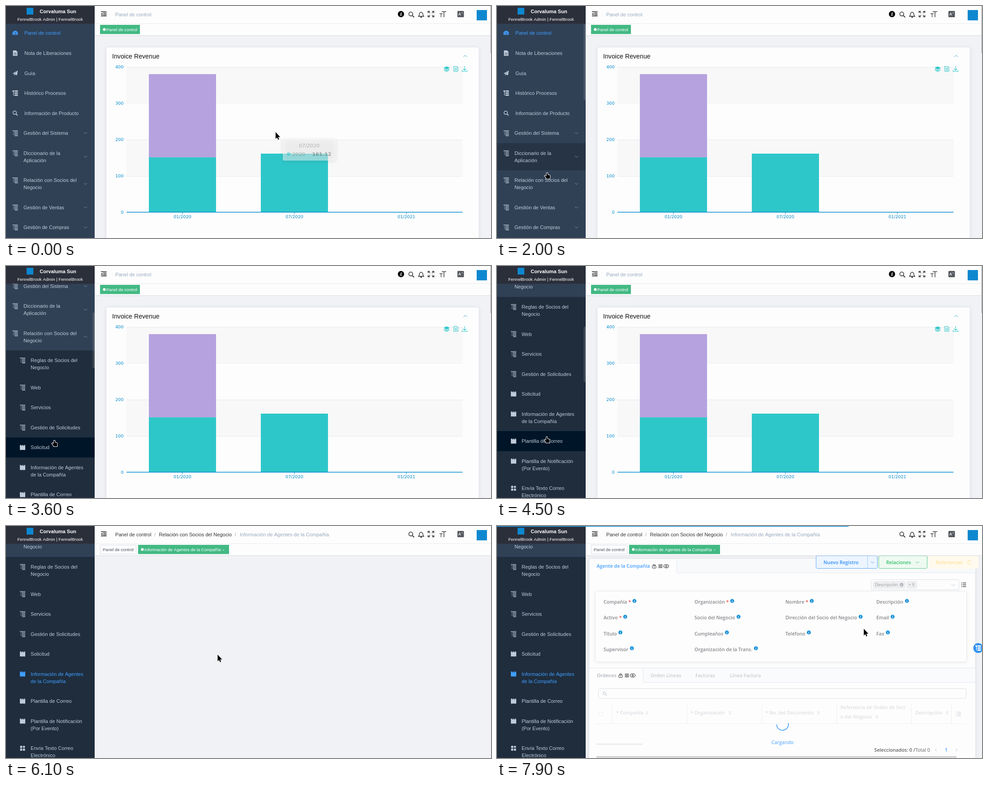
These frames come from a looping animation (1083x517 px, 8 s). An HTML page with a canvas:

```html
<!DOCTYPE html>
<html lang="es">
<head>
<meta charset="utf-8">
<title>Panel de control</title>
<style>
html, body { margin: 0; width: 100%; height: 100%; overflow: hidden; background: #f1f2f5; }
canvas { display: block; }
</style>
</head>
<body>
<canvas id="stage" width="1083" height="517"></canvas>
<script>
const W = 1083, H = 517, LOOP = 8000, STEP = 100;
const SANS = '"Liberation Sans", Arial, sans-serif';
const CHART = '"DejaVu Sans", sans-serif';
const FORM = '"Open Sans", "Noto Sans", sans-serif';
const TEAL = '#2ec7c9', PURPLE = '#b6a2de', AXIS = '#008acd', BLUE = '#409eff', PAPER = '#fdfdfd';
const screen = document.getElementById('stage').getContext('2d');
const layer = new OffscreenCanvas(W, H).getContext('2d');
let g = screen;

// Timing
const clamp = v => Math.max(0, Math.min(1, v));
const span = (t, start, length) => clamp((t - start) / length);
const smooth = p => p * p * (3 - 2 * p);

function bezier(x1, y1, x2, y2) {
  const at = (a, b, s) => 3 * a * s * (1 - s) ** 2 + 3 * b * s * s * (1 - s) + s ** 3;
  return p => {
    if (p <= 0 || p >= 1) return clamp(p);
    let lo = 0, hi = 1;
    for (let i = 0; i < 20; i++) {
      const mid = (lo + hi) / 2;
      if (at(x1, x2, mid) < p) lo = mid; else hi = mid;
    }
    return at(y1, y2, lo);
  };
}
const ease = bezier(.25, .1, .25, 1), easeInOut = bezier(.42, 0, .58, 1);

function track(keys, t) {
  const i = keys.findIndex(k => k[0] > t);
  if (i < 0) return keys[keys.length - 1].slice(1);
  if (i === 0) return keys[0].slice(1);
  const a = keys[i - 1], b = keys[i], p = smooth((t - a[0]) / (b[0] - a[0]));
  return [a[1] + (b[1] - a[1]) * p, a[2] + (b[2] - a[2]) * p];
}

// Drawing helpers
function text(str, x, y, size, color, { font = SANS, weight = 400, align = 'left' } = {}) {
  g.font = `${weight} ${size}px ${font}`;
  g.textAlign = align;
  g.fillStyle = color;
  g.fillText(str, x, y + size * .36);
  return g.measureText(str).width;
}
const label = (str, x, y, color, more) => text(str, x, y, 10.7, color, { font: FORM, weight: 600, ...more });

function rect(x, y, w, h, fill) { g.fillStyle = fill; g.fillRect(x, y, w, h); }

function box(x, y, w, h, r, fill, stroke, shadow) {
  g.beginPath();
  g.roundRect(x, y, w, h, r);
  if (shadow) { g.shadowColor = shadow; g.shadowBlur = 9; g.shadowOffsetY = 1.5; }
  g.fillStyle = fill;
  g.fill();
  g.shadowColor = 'transparent';
  if (stroke) { g.strokeStyle = stroke; g.lineWidth = 1; g.stroke(); }
}

function line(color, width, ...pts) {
  g.beginPath();
  for (let i = 0; i < pts.length; i += 2) g.lineTo(pts[i], pts[i + 1]);
  g.strokeStyle = color;
  g.lineWidth = width;
  g.stroke();
}

function disc(x, y, r, fill) {
  g.beginPath();
  g.arc(x, y, r, 0, 7);
  g.fillStyle = fill;
  g.fill();
}

function ring(x, y, r, color, width, from = 0, to = 2 * Math.PI) {
  g.beginPath();
  g.arc(x, y, r, from, to);
  g.strokeStyle = color;
  g.lineWidth = width;
  g.stroke();
}

function shape(x, y, pts, fill, stroke, width = 1) {
  g.beginPath();
  for (let i = 0; i < pts.length; i += 2) g.lineTo(x + pts[i], y + pts[i + 1]);
  g.closePath();
  if (stroke) { g.strokeStyle = stroke; g.lineWidth = width; g.stroke(); }
  if (fill) { g.fillStyle = fill; g.fill(); }
}

const chevron = (x, y, color, dir = 1, s = 3.5) =>
  line(color, 1, x - s, y - dir * s / 2, x, y + dir * s / 2, x + s, y - dir * s / 2);

// Icons, centred on x, y
const icons = {
  gauge(x, y, c) {
    g.beginPath();
    g.arc(x, y + 1, 6.3, 2.7, .44);
    g.closePath();
    g.fillStyle = c;
    g.fill();
    line('#304156', 1.2, x, y + 3, x + 1.5, y - 2);
    [[-4, 1], [-2.5, -2], [4, 1]].forEach(([a, b]) => disc(x + a, y + b, .8, '#304156'));
  },
  page(x, y, c) {
    shape(x, y, [-5, -6, 2, -6, 5, -3, 5, 6, -5, 6], c);
    line('#304156', 1, x - 3, y, x + 3, y);
    line('#304156', 1, x - 3, y + 3, x + 3, y + 3);
  },
  plane(x, y, c) {
    shape(x, y, [-6, 1, 6, -6, 4, 5, 0, 3, -2, 6, -2, 2], c);
    line('#304156', .8, x - 2, y + 2, x + 4, y - 4);
  },
  tree(x, y, c) {
    rect(x - 6, y - 6, 4, 3, c);
    line(c, 1, x - 4, y - 4, x - 4, y + 4.5, x, y + 4.5);
    line(c, 1, x - 4, y, x, y);
    [-6, -1.5, 3].forEach(d => rect(x - 1, y + d, 7, 3, c));
  },
  search(x, y, c, s = 1) {
    ring(x - s, y - s, 3.8 * s, c, 1.5 * s);
    line(c, 1.9 * s, x + 2 * s, y + 2 * s, x + 5.5 * s, y + 5.5 * s);
  },
  list(x, y, c) {
    rect(x - 6, y - 6, 12, 1.3, c);
    [-3, 0, 3, 5.6].forEach((d, i) => {
      rect(x - (i === 3 ? 1 : 2), y + d - .3, i === 3 ? 7 : 8, 1.3, c);
      if (i < 3) rect(x - 4.5, y + d - .3, 1.2, 1.3, c);
    });
  },
  tab(x, y, c) {
    rect(x - 6, y - 4, 12, 9.5, c);
    rect(x - 6, y - 5.5, 3, 2, c);
    rect(x - 1.5, y - 5.5, 3, 1.2, c);
    rect(x + 3, y - 5.5, 3, 1.2, c);
  },
  grid(x, y, c) {
    box(x - 5.5, y - 5.5, 4.8, 4.8, 1, c);
    box(x + .7, y - 5.5, 4.8, 4.8, 2.4, c);
    box(x - 5.5, y + .7, 4.8, 4.8, 1, c);
    box(x + .7, y + .7, 4.8, 4.8, 1, c);
  },
  lock(x, y) {
    ring(x, y - 1.5, 2.3, '#303133', 1.1, Math.PI, 0);
    box(x - 4, y - 1, 8, 5.5, 1, PAPER, '#303133');
    rect(x - .5, y + .5, 1, 2.2, '#303133');
  },
  bars(x, y, c = '#303133') { [-3.6, -.6, 2.4].forEach(d => rect(x - 4.5, y + d, 9, 1.4, c)); },
  eye(x, y) {
    g.beginPath();
    g.ellipse(x, y, 5.6, 3.8, 0, 0, 7);
    g.strokeStyle = '#303133';
    g.lineWidth = 1.1;
    g.stroke();
    ring(x, y, 1.7, '#303133', 1.1);
  },
  rows(x, y, c) {
    [-4, 0, 4].forEach(d => { rect(x - 5.5, y + d - .7, 2, 1.5, c); rect(x - 2, y + d - .7, 7.5, 1.5, c); });
  },
  info(x, y, r, c) {
    disc(x, y, r, c);
    text('i', x, y, r * 1.6, '#fff', { font: '"Noto Serif", serif', weight: 'italic 700', align: 'center' });
  },
  sort(x, y, c) {
    shape(x, y, [-3.5, -1, 0, -4, 3.5, -1], c);
    shape(x, y, [-3.5, 1, 0, 4, 3.5, 1], c);
  }
};

// Sidebar
const ROW = 44.55, ROW2 = 60.5, EXPAND = 2400, CLICK = 5520;
const OPEN_GROUP = 7, OPEN_PAGE = 5;
const menu = [
  ['gauge', 'Panel de control'], ['page', 'Nota de Liberaciones'], ['plane', 'Guía'],
  ['tree', 'Histórico Procesos'], ['search', 'Información de Producto'],
  ['list', 'Gestión del Sistema'], ['list', 'Diccionario de la', 'Aplicación'],
  ['list', 'Relación con Socios del', 'Negocio'],
  ['list', 'Gestión de Ventas'], ['list', 'Gestión de Compras']
];
const submenu = [
  ['list', 'Reglas de Socios del', 'Negocio'], ['list', 'Web'], ['list', 'Servicios'],
  ['list', 'Gestión de Solicitudes'], ['tab', 'Solicitud'],
  ['tab', 'Información de Agentes', 'de la Compañía'], ['tab', 'Plantilla de Correo'],
  ['tab', 'Plantilla de Notificación', '(Por Evento)'], ['grid', 'Envía Texto Correo', 'Electrónico']
];
const cursorKeys = [
  [0, 602, 281], [200, 598, 278], [700, 414, 212], [900, 340, 222], [1400, 124, 270],
  [2000, 112, 372], [2300, 108, 394], [3000, 107, 390], [3600, 108, 389], [4400, 110, 384],
  [5000, 126, 344], [5700, 126, 344], [6500, 819, 229]
];
const cursorAt = t => track(cursorKeys, t);
const scrollAt = t => 119.25 * [2900, 3250, 4000].reduce((sum, s) => sum + ease(span(t, s, 200)), 0);

function menuRow([icon, first, second], y, nested, t, index) {
  const h = second ? ROW2 : ROW, mid = y + h / 2, top = second ? mid - 7.9 : mid;
  const [cx, cy] = cursorAt(t - STEP);
  const hover = cx < 198 && cy > Math.max(y, 40) && cy < y + h;
  rect(0, y, 198, h + .5, nested ? (hover ? '#001528' : '#1f2d3d') : (hover ? '#263445' : '#304156'));
  const active = nested ? index === OPEN_PAGE && t >= CLICK : index === 0 && t < CLICK;
  const color = active ? (t < 5700 && nested ? '#74afea' : BLUE) : '#bfcbd9';
  icons[icon](nested ? 37 : 20.5, top, color);
  const x = nested ? 55 : icon === 'list' ? 39 : 41;
  text(first, x, top, 11.13, color);
  if (second) text(second, x, mid + 7.9, 11.13, color);
  if (!nested && icon === 'list') chevron(177.5, mid, '#8292a4', index === OPEN_GROUP && t > EXPAND ? -1 : 1);
  return y + h;
}

function sidebar(t) {
  rect(0, 0, 198, H, '#304156');
  const scroll = scrollAt(t), open = ease(span(t, EXPAND, 300));
  let y = 38.2 - scroll;
  menu.forEach((item, i) => {
    y = menuRow(item, y, false, t, i);
    if (i !== OPEN_GROUP || !open) return;
    g.save();
    g.beginPath();
    g.rect(0, y, 198, 600 * open);
    g.clip();
    submenu.reduce((sy, sub, k) => menuRow(sub, sy, true, t, k), y);
    g.restore();
    y += 600 * open;
  });
  if (t > 1300 && t < 5900) {
    const size = 170 - 46 * open;
    box(193.5, 40 + scroll * .265, 4.5, size, 2, 'rgba(144,147,153,.3)');
  }
  rect(0, 0, 198, 39.5, '#2b2f3a');
  rect(46, 4, 15, 15, '#0d88d0');
  text('Corvaluma Sun', 116, 12, 11.13, '#fff', { weight: 700, align: 'center' });
  text('FennelBrook Admin | FennelBrook', 98.5, 30, 9.6, '#fff', { align: 'center' });
}

// Header
function header(t) {
  const moved = t >= CLICK;
  rect(198, 0, 885, 65.5, PAPER);
  rect(198, 39, 885, 1, '#e8eaee');
  rect(198, 65.5, 885, 1, '#d8dce5');
  [12, 15.3, 18.6, 21.4].forEach((y, i) => rect(i % 3 ? 217 : 212, y, i % 3 ? 7.5 : 12.5, 1.5, '#1c1c1c'));
  shape(212, 18, [0, 0, 3.5, -2.5, 3.5, 2.5], '#1c1c1c');

  text('Panel de control', 244, 18.5, 11.13, moved ? '#303133' : '#97a8be');
  if (moved) {
    const p = ease(span(t, CLICK, 500)), dx = 15.9 * (1 - p);
    text('/', 331, 18.5, 11.13, '#a0a5af');
    g.globalAlpha = p;
    text('Relación con Socios del Negocio', 341.5 + dx, 18.5, 11.13, '#303133');
    text('/', 511 + dx, 18.5, 11.13, '#a0a5af');
    text('Información de Agentes de la Compañía', 522 + dx, 18.5, 11.13, '#97a8be');
    g.globalAlpha = 1;
    box(210.5, 42.5, 80, 19.5, 0, PAPER, '#d8dce5');
    text('Panel de control', 216, 52.5, 9.55, '#495060');
    rect(295, 42, 203, 20.5, '#42b983');
    disc(304.5, 52.3, 3.1, '#fff');
    text('Información de Agentes de la Compañía', 309, 52.5, 9.55, '#fff');
    text('×', 483.5, 53, 7, '#d5efe3');
  } else {
    rect(210, 42, 89, 20.5, '#42b983');
    disc(219.5, 52.3, 3.1, '#fff');
    text('Panel de control', 224, 52.5, 9.55, '#fff');
    icons.info(882, 18, 7, '#000');
  }

  icons.search(905, 19, '#444', 1.15);
  shape(927, 19, [-6, 4, -4, 1, -3.5, -3, 0, -5.5, 3.5, -3, 4, 1, 6, 4], null, '#222', 1.3);
  disc(927, 25, 1.5, '#222');
  for (const a of [-1, 1]) for (const b of [-1, 1]) {
    line('#444', 1.5, 949 + a * 2, 18 + b * 2, 949 + a * 6, 18 + b * 6);
    line('#444', 1.7, 949 + a * 2.5, 18 + b * 6.2, 949 + a * 6.5, 18 + b * 6.2, 949 + a * 6.5, 18 + b * 2.5);
  }
  line('#555', 1.7, 973, 12.5, 983, 12.5);
  line('#555', 1.7, 978, 12.5, 978, 25);
  line('#555', 1.5, 968, 17, 975, 17);
  line('#555', 1.5, 971.5, 17, 971.5, 25);
  box(1008, 11, 14.5, 14, 1.5, '#55595f');
  text('A', 1013, 18, 8.5, '#fff', { weight: 700, align: 'center' });
  text('z', 1018.5, 15.5, 5, '#fff', { align: 'center' });
  rect(1051, 9, 23, 23, '#0d88d0');
}

function progress(t, start) {
  if (t < start || t > start + 600) return;
  g.globalAlpha = 1 - span(t, start + 350, 250);
  rect(0, 0, W * track([[0, 0, 0], [200, .725, 0], [300, 1, 0]], t - start)[0], 1.6, '#2299dd');
  g.globalAlpha = 1;
}

// Dashboard
const valueY = v => 459.5 - v * .81;

function bar(x, from, to, fill) { rect(x, valueY(to), 150, valueY(from) - valueY(to), fill); }

function tooltip(x, y, title, rows, alpha) {
  g.globalAlpha = alpha;
  box(x, y, 118, 29 + rows.length * 19, 3, PAPER, null, 'rgba(0,0,0,.22)');
  text(title, x + 59, y + 14.5, 11.13, '#777', { font: CHART, align: 'center' });
  rows.forEach(([name, value, color], i) => {
    const ry = y + 33.5 + i * 19;
    disc(x + 13, ry, 4, color);
    text(name, x + 21.5, ry, 11.13, '#777', { font: CHART });
    text(value, x + 108.5, ry, 11.13, '#5c5c5c', { font: CHART, weight: 700, align: 'right' });
  });
  g.globalAlpha = 1;
}

function toolbox() {
  const c = TEAL;
  shape(984, 140, [-6, -2, 0, -5, 6, -2, 0, 1], c, c);
  line(c, 1.2, 978, 140.5, 984, 143.5, 990, 140.5);
  line(c, 1.2, 978, 143, 984, 146, 990, 143);
  shape(1004.5, 140, [-4.5, -5.5, 2, -5.5, 4.5, -3, 4.5, 5.5, -4.5, 5.5], null, c, 1.1);
  [-1.5, .8, 3].forEach(d => line(c, 1, 1002, 140 + d, 1007, 140 + d));
  line(c, 1.1, 1024, 134, 1024, 143);
  line(c, 1.1, 1020.5, 140, 1024, 143.5, 1027.5, 140);
  line(c, 1.1, 1018.5, 143, 1018.5, 146, 1029.5, 146, 1029.5, 143);
}

function dashboard(t) {
  box(224, 92, 832, 450, 3, PAPER, '#e6ebf5', 'rgba(0,0,0,.1)');
  text('Invoice Revenue', 237, 111.5, 14.2, '#111');
  chevron(1025.5, 111.5, '#3aa3c8', -1, 4);
  for (let v = 0; v <= 400; v += 100) {
    const y = valueY(v);
    if (v === 400 || v === 200) rect(269, y, 750.5, 81, '#f8f8f8');
    if (v) rect(269, Math.round(y), 750.5, 1, '#e9e9ef');
    text(v, 262.5, y, 9.55, AXIS, { font: CHART, align: 'right' });
  }
  const hover = t >= 400 && t < 1000;
  if (hover) rect(279, 136, 250, 323, 'rgba(150,150,150,.16)');
  bar(319, 0, 151.05, hover ? '#4fcfd1' : TEAL);
  bar(319, 151.05, 379.9, hover ? '#c2b1e5' : PURPLE);
  bar(569, 0, 161.12, TEAL);
  line(AXIS, 1.5, 269, 459.5, 1019.5, 459.5);
  ['01/2020', '07/2020', '01/2021'].forEach((name, i) => {
    const x = 394 + i * 250;
    line(AXIS, 1, x, 460, x, 464);
    text(name, x, 470, 9.55, AXIS, { font: CHART, align: 'center' });
  });
  toolbox();
  if (t < 150) tooltip(618, 296.5, '07/2020', [['2020', '161.12', TEAL]], .5 * (1 - t / 150));
  if (t >= 400 && t < 1150) {
    const [x, y] = track([[400, 600, 278], [700, 526, 222], [950, 372, 226]], t);
    tooltip(x, y, '01/2020', [['2020', '151.05', TEAL], ['2021', '228.85', PURPLE]], 1 - span(t, 1000, 150));
  }
}

// Record window
const FORM_AT = 7400;
const fields = [
  ['Compañía *', 'Organización *', 'Nombre *', 'Descripción'],
  ['Activo *', 'Socio del Negocio', 'Dirección del Socio del Negocio', 'Email'],
  ['Título', 'Cumpleaños', 'Teléfono', 'Fax'],
  ['Supervisor', 'Organización de la Trans.']
];

function tabTools(x, y) {
  icons.lock(x, y);
  icons.bars(x + 14, y);
  icons.eye(x + 27, y);
}

function button(x, w, name, color, fill, border) {
  box(x + .5, 66.5, w - 1, 28, 3, fill, border);
  label(name, x + 17, 81, color);
}

function form() {
  box(835.5, 119.5, 196, 23, 3, PAPER, '#dcdfe6');
  box(840, 123.5, 71, 15, 2, '#efeff1', '#e3e4e8');
  text('Descripción', 844, 131, 9.4, '#909399', { font: FORM });
  disc(903.5, 131, 4.2, '#b4b7bd');
  text('×', 903.5, 131, 7, '#fff', { align: 'center' });
  box(915, 123.5, 22, 15, 2, '#efeff1', '#e3e4e8');
  text('+ 9', 919, 131, 9.4, '#909399', { font: FORM });
  chevron(1018.5, 131.5, '#c0c4cc', 1, 4);
  icons.rows(1042, 131, '#444');
  box(219.5, 145.5, 829, 157, 3, PAPER, '#e8ebf2', 'rgba(0,0,0,.08)');
  fields.forEach((row, r) => row.forEach((name, c) => {
    const x = 238 + c * 203, y = 169.5 + r * 35.1, required = name.endsWith('*');
    let end = x + label(name.replace(' *', ''), x, y, '#85878c');
    if (required) { label('*', end + 3, y, '#f04848'); end += 8.5; }
    icons.info(end + 8, y - 2.5, 4.4, '#1890d8');
  }));
}

function records(t) {
  const pale = '#dcdee3', rule = '#eceef3';
  rect(206, 316, 862, 214, PAPER);
  rect(326, 316, 742, 32, '#fafbfc');
  line('#dfe4ed', 1, 206, 316.5, 1068, 316.5);
  line('#e4e7ed', 1, 326.5, 317, 326.5, 348.5, 1068, 348.5);
  label('Ordenes', 223, 333, '#b0b3b9');
  tabTools(276, 333);
  label('Orden Líneas', 343, 333, '#c9ccd2');
  label('Facturas', 443, 333, '#c9ccd2');
  label('Línea Factura', 520, 333, '#c9ccd2');
  box(226.5, 362.5, 821, 21.5, 3, PAPER, '#dcdfe6');
  icons.search(240.5, 373.5, '#ccd0d8', .8);

  [257, 424, 591, 758, 925, 1014].forEach(x => line(rule, 1, x + .5, 397, x + .5, 440));
  line(rule, 1, 222, 440.5, 1048, 440.5);
  box(227.5, 414.5, 9, 9, 1, PAPER, rule);
  [['* Compañía', 266, 416.5, 335], ['* Organización', 432, 416.5, 520],
   ['* No. del Documento', 599, 416.5, 718], ['Referencia de Orden de Soci', 767, 404],
   ['o del Negocio', 767, 425.5, 848], ['Descripción', 934, 416.5, 1005]].forEach(([name, x, y, sortX]) => {
    label(name, x, y, pale);
    if (sortX) icons.sort(sortX, y, '#e3e5ea');
  });
  icons.rows(1030.5, 419, '#d3d5da');
  rect(222, 485, 103, 2.5, '#e9e9f2');

  const s = Math.max(0, t - 6900), cycle = s % 1500 / 1500, turn = s / 2000;
  const grow = easeInOut(clamp(cycle * 2)), shift = easeInOut(clamp(cycle * 2 - 1));
  const from = 40 * grow + 80 * shift, length = Math.min(1 + 89 * grow, 126 - from);
  const angle = d => (d / 126 + turn) * 2 * Math.PI;
  ring(637.5, 442, 13.2, BLUE, 1.6, angle(from), angle(from + length));
  text('Cargando', 637.5, 482, 11, BLUE, { font: FORM, align: 'center' });

  const w = label('Seleccionados: 0 /', 842.5, 499, '#606266');
  text('Total 0', 842.5 + w, 499, 10.7, '#606266', { font: FORM });
  line('#b8bcc4', 1, 981.5, 496, 978.5, 499, 981.5, 502);
  label('1', 1003, 499, BLUE, { align: 'center' });
  line('#b8bcc4', 1, 1024.5, 496, 1027.5, 499, 1024.5, 502);
  rect(222, 513.5, 804, 2.2, '#b9babd');
}

function recordPage(t) {
  const ready = t >= FORM_AT, up = ready ? 0 : 187;
  box(206, 73, 862, 457 - up, 2, PAPER, '#e4e7ed', 'rgba(0,0,0,.1)');
  rect(401, 73, 667, 31, '#f8f9fb');
  line('#e4e7ed', 1, 401.5, 73, 401.5, 104.5, 1068, 104.5);
  label('Agente de la Compañía', 222.5, 89.5, BLUE);
  tabTools(351, 89.5);
  button(712, 138, 'Nuevo Registro', '#2f8ff5', '#ecf5ff', '#5aa6f2');
  line('#9ccbff', 1, 827.5, 67, 827.5, 94);
  chevron(838.5, 81, BLUE);
  button(852, 109, 'Relaciones', '#2fbf67', '#eefaf1', '#5ecb85');
  chevron(939, 81, '#2fbf67');
  button(963, 112, 'Referencias', '#ffe29c', '#fffaed', '#fffaf0');
  if (ready) ring(1055, 81, 4, '#ffe29c', 1.2, .5, 5.6);
  else chevron(1055, 81, '#ffe29c');
  if (ready) form();
  g.save();
  g.translate(0, -up);
  records(t);
  g.restore();
  const x = ready ? 1074.5 : 1078.5, y = ready ? 272 : 306;
  disc(x, y, 11, '#2f93f5');
  icons.tree(x, y, '#fff');
}

function withLayer(alpha, dx, draw) {
  layer.clearRect(0, 0, W, H);
  g = layer;
  g.save();
  g.translate(dx, 0);
  draw();
  g.restore();
  g = screen;
  g.globalAlpha = alpha;
  g.drawImage(layer.canvas, 0, 0);
  g.globalAlpha = 1;
}

// Pointer
const arrow = [0, 0, 0, 15, 3.3, 12, 5.6, 17, 7.8, 16, 5.6, 11, 10.2, 11];
const hand = [-1, 0, 1, 0, 1.6, 4.5, 4, 4.6, 6, 5.6, 6.5, 8, 6, 13, -1.5, 13, -3.2, 9, -5.5, 6.8, -4.5, 5.5, -1.6, 7];

function pointer(t) {
  const [x, y] = cursorAt(t);
  const onBar = t < 1000 && x > 319 && x < 469 && y > 152;
  shape(x, y, x < 198 || onBar ? hand : arrow, '#000', '#fff', 2);
}

function draw(t) {
  rect(0, 0, W, H, '#f1f2f5');
  const leave = ease(span(t, CLICK, 500)), enter = ease(span(t, 6800, 500));
  if (leave < 1) withLayer(1 - leave, 24 * leave, () => dashboard(t));
  if (enter > 0) withLayer(enter, -24 * (1 - enter), () => recordPage(t));
  header(t);
  if (leave < 1) rect(1082, 0, 1, 105, '#8f9196');
  sidebar(t);
  progress(t, 5400);
  progress(t, 7700);
  pointer(t);
}

function tick(now) {
  draw(Math.floor(now % LOOP / STEP) * STEP);
  requestAnimationFrame(tick);
}
draw(0);
requestAnimationFrame(tick);
</script>
</body>
</html>
```
